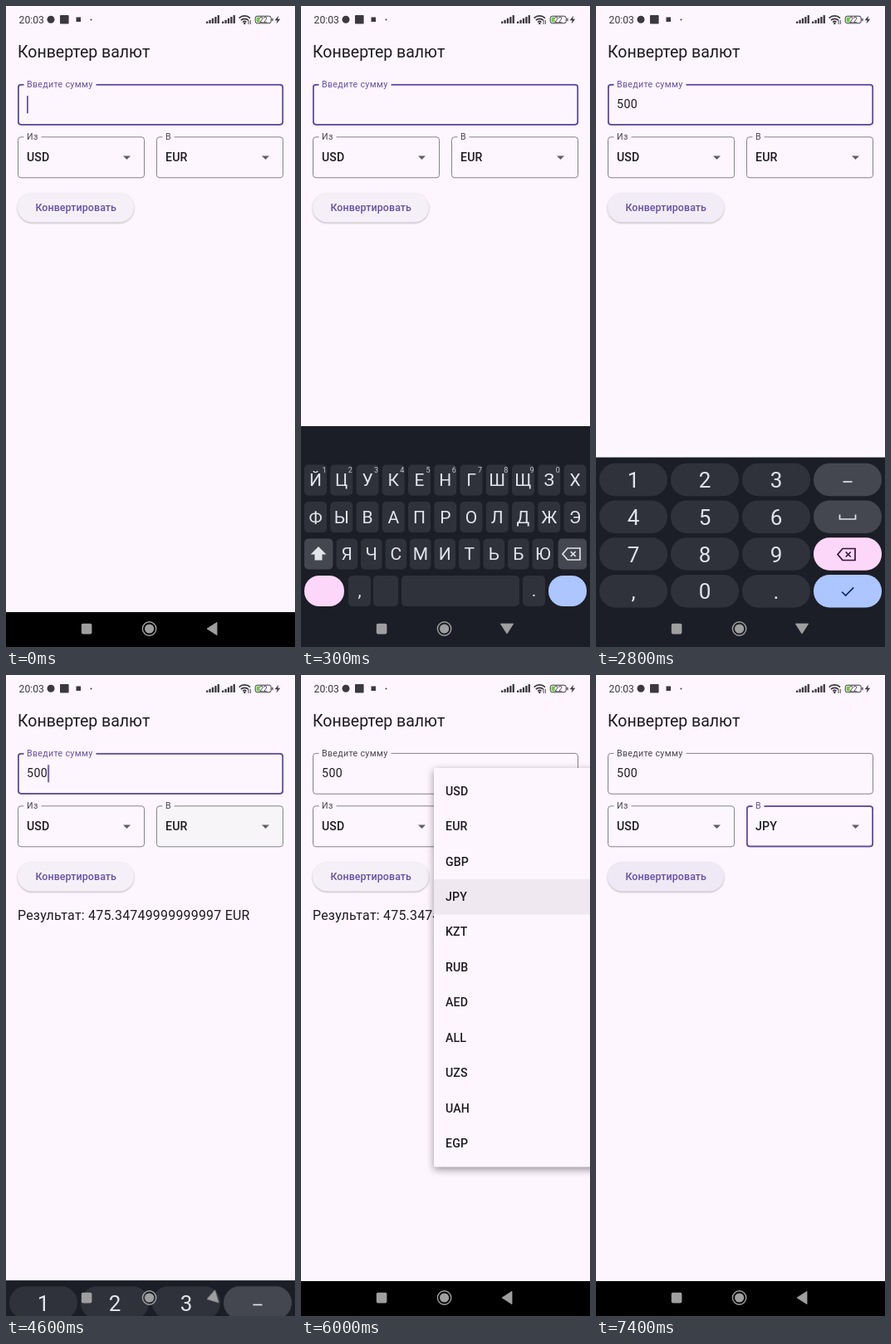
An HTML page that plays this animation: 348x772 px, repeating every 8000 ms.

```html
<!DOCTYPE html>
<html lang="ru">
<head>
<meta charset="utf-8">
<title>Конвертер валют</title>
<style>
html, body { margin: 0; width: 100%; height: 100%; overflow: hidden; background: #fef6ff; }
svg { display: block; width: 100%; height: 100%; font-family: Roboto, "Noto Sans", sans-serif; }
text { white-space: pre; }

.title { font-size: 19.5px; fill: #1d1b20; }
.label { font-size: 10.63px; letter-spacing: .33px; fill: #49454f; }
.value { font-size: 14.17px; letter-spacing: .44px; }
.item { font-size: 14.17px; font-weight: 500; letter-spacing: .13px; fill: #1d1b20; }
.action { font-size: 12.4px; font-weight: 500; letter-spacing: .09px; fill: #6750a4; }
.result { font-size: 15.94px; letter-spacing: .22px; fill: #1d1b20; }
.box { fill: none; stroke: #79747e; stroke-width: .9; }
.ring { fill: none; stroke: #5f4aa2; stroke-width: 1.8; }
.gap { fill: #fef6ff; }
.status { fill: #3b393f; }
.nav { fill: #9f9f9f; }
.board { fill: #1b1e26; }
.key { fill: #2f323a; }
.alt { fill: #44474f; }
.pink { fill: #fcd7fa; }
.blue { fill: #adc6ff; }
.digit { font-size: 26px; fill: #e2e4ec; text-anchor: middle; }
.letter { font-size: 21px; fill: #e2e4ec; text-anchor: middle; }
.hint { font-size: 9px; fill: #c6c8d0; text-anchor: middle; }
.line { fill: none; stroke-width: 1.7; }
.raised { filter: drop-shadow(0 1px 1px rgba(0, 0, 0, .28)); }
.lifted { filter: drop-shadow(0 3px 5px rgba(0, 0, 0, .42)); }

/* Everything advances in hard steps on one 8 s clock. */
.anim { animation: 8s step-end infinite; }

#caret { animation-name: blink, advance; }
@keyframes blink {
  0%, 10%, 27.5%, 41.25%, 53.75% { opacity: 1 }
  3.75%, 21.25%, 35%, 47.5%, 62.5%, 100% { opacity: 0 }
}
@keyframes advance {
  0% { transform: none }
  12.5% { transform: translateX(8.4px) }
  13.75% { transform: translateX(16.8px) }
  15%, 100% { transform: translateX(25.2px) }
}
#d1 { animation-name: type1 }
#d2 { animation-name: type2 }
#d3 { animation-name: type3 }
@keyframes type1 { 0% { fill: transparent } 12.5%, 100% { fill: #1d1b20 } }
@keyframes type2 { 0% { fill: transparent } 13.75%, 100% { fill: #1d1b20 } }
@keyframes type3 { 0% { fill: transparent } 15%, 100% { fill: #1d1b20 } }

#key5 { animation-name: press5 }
#key0 { animation-name: press0 }
@keyframes press5 { 0%, 13.75%, 100% { fill: #2f323a } 12.5% { fill: #4a4d56 } }
@keyframes press0 { 0%, 16.25%, 100% { fill: #2f323a } 13.75% { fill: #4a4d56 } }

#letters { animation-name: letters }
@keyframes letters {
  0%, 5%, 100% { transform: translateY(280px) }
  1.25% { transform: translateY(84px) }
  2.5% { transform: translateY(6px) }
  3.75% { transform: none }
}
#pad { animation-name: pad }
@keyframes pad {
  0%, 60%, 100% { transform: translateY(280px) }
  5% { transform: none }
  57.5% { transform: translateY(185.5px) }
  58.75% { transform: translateY(222px) }
}
#back { transform-box: fill-box; transform-origin: center; animation-name: turn }
@keyframes turn {
  0%, 60%, 100% { transform: rotate(0deg) }
  1.25% { transform: rotate(-34deg) }
  2.5% { transform: rotate(-80deg) }
  3.75% { transform: rotate(-90deg) }
  57.5% { transform: rotate(-16deg) }
  58.75% { transform: rotate(-3deg) }
}

#tint { fill: #6750a4; animation-name: tint }
@keyframes tint {
  0%, 37.5%, 100% { opacity: 0 }
  27.5%, 86.25% { opacity: .03 }
  28.75%, 88.75% { opacity: .07 }
  30% { opacity: .02 }
  87.5% { opacity: .06 }
  92.5% { opacity: .04 }
}
#result { animation-name: result }
@keyframes result { 0%, 77.5%, 100% { opacity: 0 } 46.25% { opacity: 1 } }

#sumLabel { animation-name: blurLabel }
@keyframes blurLabel { 0% { fill: #6750a4 } 62.5%, 100% { fill: #49454f } }
#toLabel { animation-name: focusLabel }
@keyframes focusLabel { 0% { fill: #49454f } 62.5%, 100% { fill: #6750a4 } }
#sumRing { animation-name: hide }
@keyframes hide { 0% { opacity: 1 } 65%, 100% { opacity: 0 } }
#toRing { animation-name: show }
@keyframes show { 0% { opacity: 0 } 65%, 100% { opacity: 1 } }
#touch { fill: #f8f5f9; animation-name: touch }
@keyframes touch { 0%, 65%, 100% { opacity: 0 } 56.25% { opacity: 1 } }

#eur { animation-name: eur }
#jpy { animation-name: jpy }
@keyframes eur { 0% { opacity: 1 } 76.25%, 100% { opacity: 0 } }
@keyframes jpy { 0% { opacity: 0 } 76.25%, 100% { opacity: 1 } }

#menu { animation-name: menu }
@keyframes menu { 0%, 77.5%, 100% { opacity: 0 } 65% { opacity: 1 } 76.25% { opacity: .5 } }
#sheet { transform-origin: 0 182px; animation-name: sheet }
@keyframes sheet { 0%, 66.25%, 100% { transform: none } 65% { transform: scaleY(.85) } }
#items { animation-name: items }
@keyframes items { 0%, 66.25%, 100% { opacity: 1 } 65% { opacity: .4 } }
#pick { fill: #1d1b20; animation-name: pick }
@keyframes pick { 0%, 77.5%, 100% { opacity: 0 } 75% { opacity: .06 } }
</style>
</head>
<body>
<svg viewBox="0 0 348 772" preserveAspectRatio="none">
  <rect class="gap" width="348" height="772"/>

  <g class="status" id="bar">
    <text x="15.6" y="20.9" font-size="12.2">20:03</text>
    <circle cx="54" cy="16.3" r="4.5"/>
    <rect x="65" y="11" width="10.6" height="10.6" rx="1"/>
    <rect x="84.5" y="13.5" width="5.5" height="5.5"/>
    <circle cx="102.5" cy="16.5" r="1"/>
    <g fill="none" stroke="#3b393f" stroke-width="1.7">
      <path d="M280.6 14.6a9.6 9.6 0 0 1 13.4 0M282.9 17.2a6.2 6.2 0 0 1 8.8 0M285.2 19.5a3 3 0 0 1 4.2 0"/>
      <rect x="300.2" y="12.2" width="19" height="8.6" rx="2.4" stroke-width="1"/>
    </g>
    <circle cx="287.3" cy="21" r="1.2"/>
    <path d="M292 17v5M294.3 17v5" stroke="#3b393f" stroke-width=".9"/>
    <rect x="301.6" y="13.6" width="4" height="5.8" rx="1" fill="#76c84f"/>
    <rect x="320.3" y="14.8" width="1.3" height="3.4" rx=".6"/>
    <text x="309.8" y="19.6" font-size="8.6" text-anchor="middle">22</text>
    <path d="M328.2 11.8l-4.6 5.4h3l-1 4.2 4.6-5.6h-3z"/>
  </g>

  <text class="title" x="14" y="61.6">Конвертер валют</text>

  <rect class="box" x="14.5" y="94.4" width="319" height="48.8" rx="3.5"/>
  <rect class="ring anim" id="sumRing" x="14.9" y="94.8" width="318.3" height="48" rx="3.2"/>
  <rect class="gap" x="21.5" y="93" width="87" height="4"/>
  <text class="label anim" id="sumLabel" x="25" y="98">Введите сумму</text>
  <text class="value" x="25" y="123.2"><tspan class="anim" id="d1">5</tspan><tspan class="anim" id="d2">0</tspan><tspan class="anim" id="d3">0</tspan></text>
  <rect class="anim" id="caret" x="25" y="108" width="1.8" height="21.5" rx=".8" fill="#6750a4"/>

  <rect class="box" x="14.5" y="157.8" width="152" height="49" rx="3.5"/>
  <rect class="gap" x="21.5" y="156" width="21" height="4"/>
  <text class="label" x="25" y="161.4">Из</text>
  <text class="item" x="25" y="187.2">USD</text>
  <path d="M141 180.4h9l-4.5 4.5z" fill="#605d64"/>

  <rect class="anim" id="touch" x="181.5" y="157.8" width="152" height="49" rx="3.5"/>
  <rect class="box" x="181.5" y="157.8" width="152" height="49" rx="3.5"/>
  <rect class="ring anim" id="toRing" x="181.9" y="158.2" width="151.2" height="48.2" rx="3.2"/>
  <rect class="gap" x="188.5" y="156" width="14" height="4"/>
  <text class="label anim" id="toLabel" x="192" y="161.4">В</text>
  <text class="item anim" id="eur" x="192" y="187.2">EUR</text>
  <text class="item anim" id="jpy" x="192" y="187.2">JPY</text>
  <path d="M308 180.4h9l-4.5 4.5z" fill="#605d64"/>

  <rect class="raised" x="14" y="225.3" width="140" height="35.2" rx="17.6" fill="#f5f0f8"/>
  <rect class="anim" id="tint" x="14" y="225.3" width="140" height="35.2" rx="17.6"/>
  <text class="action" x="35.4" y="247.2">Конвертировать</text>

  <text class="result anim" id="result" x="14" y="294.8">Результат: 475.34749999999997 EUR</text>

  <g class="anim" id="menu">
    <g class="anim" id="sheet"><rect class="gap lifted" x="160" y="112" width="198" height="480.6" rx="1.8"/></g>
    <rect class="anim" id="pick" x="160" y="246" width="188" height="42.5"/>
    <g class="anim" id="items"></g>
  </g>

  <rect y="730" width="348" height="42"/>
  <g class="anim" id="letters"><rect class="board" y="506" width="348" height="290"/></g>
  <g class="anim" id="pad"><rect class="board" y="543.6" width="348" height="250"/></g>

  <g class="nav">
    <rect x="90.8" y="743.8" width="12.6" height="12.6" rx="1.8"/>
    <circle cx="172.6" cy="750" r="8.2" fill="none" stroke="#9f9f9f" stroke-width="1.4"/>
    <circle cx="172.6" cy="750" r="5.6"/>
    <path class="anim" id="back" d="M242 750l12-7.7v15.4z" stroke="#9f9f9f" stroke-width=".8" stroke-linejoin="round"/>
  </g>
</svg>
<script>
const $ = id => document.getElementById(id);

function add(parent, tag, attrs, text) {
  const el = document.createElementNS('http://www.w3.org/2000/svg', tag);
  for (const name in attrs) el.setAttribute(name, attrs[name]);
  if (text) el.textContent = text;
  return parent.appendChild(el);
}
const label = (parent, cls, x, y, text) => add(parent, 'text', { class: cls, x, y }, text);
const key = (parent, cls, x, y, width, height, rx) =>
  add(parent, 'rect', { class: cls, x, y, width, height, rx });
const line = (parent, d, stroke) => add(parent, 'path', { class: 'line', d, stroke });
const erase = (parent, x, y, color) =>
  line(parent, `M${x - 4.5} ${y - 7}h15v14h-15l-6-7zM${x - .8} ${y - 3}l6 6m0 -6l-6 6`, color);

// Signal bars
for (const left of [241, 260])
  for (let i = 0; i < 5; i++) {
    const height = 2.4 + i * 1.9;
    add($('bar'), 'rect', { x: left + i * 3.4, y: 21 - height, width: 2.3, height, rx: .6 });
  }

// Currency list
'USD EUR GBP JPY KZT RUB AED ALL UZS UAH EGP'.split(' ').forEach((code, i) =>
  label($('items'), 'item', 174, 144.6 + i * 42.45, code));

// Number pad
const pad = $('pad');
['123-', '456_', '789<', ',0.v'].forEach((row, r) => [...row].forEach((ch, c) => {
  const y = 550.8 + r * 44.75;
  const cls = c < 3 ? 'key' : ['alt', 'alt', 'pink', 'blue'][r];
  const cap = key(pad, cls, 4 + c * 86, y, 82, 39.4, 19.2);
  if (ch === '5' || ch === '0') {
    cap.id = 'key' + ch;
    cap.classList.add('anim');
  }
  if (c < 3) label(pad, 'digit', 45 + c * 86, y + 29.4, ch);
}));
line(pad, 'M297.5 573h11', '#e2e4ec');
line(pad, 'M293.5 612.5v5.5h19v-5.5', '#e2e4ec');
erase(pad, 301.5, 660.5, '#35123f');
line(pad, 'M296 705.5l4.6 4.6 9.6 -9.8', '#0c2a63');

// Letter keyboard
const letters = $('letters');
['ЙЦУКЕНГШЩЗХ', 'ФЫВАПРОЛДЖЭ'].forEach((row, r) => [...row].forEach((ch, i) => {
  const x = 17.5 + i * 31.25, y = 571 + r * 44.6;
  key(letters, 'key', x - 13.5, y - 18.5, 27, 37, 5);
  label(letters, 'letter', x, y + 7.3, ch);
  if (!r && i < 10) label(letters, 'hint', x + 10.5, y - 9.5, (i + 1) % 10 + '');
}));
[...'ЯЧСМИТЬБЮ'].forEach((ch, i) => {
  const x = 55.3 + i * 29.5;
  key(letters, 'key', x - 12.8, 641.5, 25.6, 37, 5);
  label(letters, 'letter', x, 667.3, ch);
});
key(letters, 'alt', 4, 641.5, 34.5, 37, 5);
key(letters, 'alt', 309.5, 641.5, 34.5, 37, 5);
add(letters, 'path', { d: 'M21 651l9.5 9.5h-5v7h-9v-7h-5z', fill: '#e2e4ec' });
erase(letters, 325.5, 660, '#e2e4ec');
key(letters, 'pink', 4, 686, 48, 37, 18);
key(letters, 'key', 57, 686, 27, 37, 5);
key(letters, 'key', 87, 686, 30, 37, 5);
key(letters, 'key', 121, 686, 142, 37, 5);
key(letters, 'key', 267, 686, 27, 37, 5);
key(letters, 'blue', 298, 686, 46, 37, 18);
label(letters, 'letter', 70.5, 711, ',');
label(letters, 'letter', 280.5, 711, '.');
</script>
</body>
</html>
```
